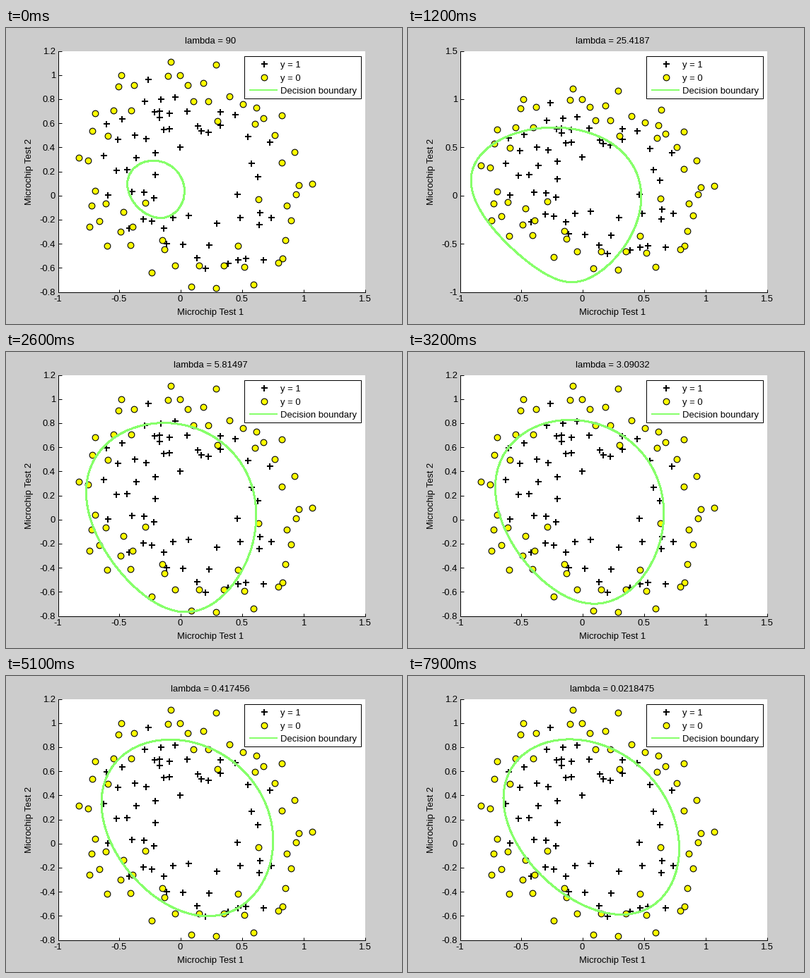
Recreate the animation shown at these times as a matplotlib script. Size 560 by 420 pixels, loop 8000 ms.

```python
import numpy as np
import matplotlib.pyplot as plt
from matplotlib.animation import FuncAnimation
from matplotlib.patches import Rectangle

W, H = 560, 420
PX = 0.72  # points per pixel at 100 dpi
FRAMES, INTERVAL = 80, 100
DEGREE = 3
GREEN = (0.53, 1, 0.42)

plt.rcParams["font.family"] = "Liberation Sans"
plt.rcParams["font.size"] = 13 * PX

passed = np.array([
    (.051, .700), (-.093, .685), (-.214, .692), (-.375, .502), (-.513, .466),
    (-.525, .210), (-.398, .034), (-.306, -.192), (.017, -.404), (.132, -.514),
    (.385, -.565), (.529, -.521), (.639, -.243), (.737, -.185), (.547, .488),
    (.322, .583), (.166, .539), (-.047, .817), (-.173, .700), (-.479, .634),
    (-.605, .597), (-.628, .334), (-.594, .005), (-.421, -.273), (-.116, -.397),
    (.201, -.602), (.466, -.536), (.673, -.536), (-.139, .546), (-.294, .780),
    (-.266, .963), (-.162, .802), (-.173, .648), (-.283, .473), (-.363, .312),
    (-.300, .027), (-.237, -.214), (-.064, -.185), (.063, -.163), (.230, -.412),
    (.293, -.229), (.483, -.185), (.645, -.141), (.460, .012), (.627, .159),
    (.575, .268), (.725, .444), (.224, .524), (.443, .670), (.322, .692),
    (.138, .575), (-.006, .400), (-.093, .553), (-.208, .356), (-.208, .173),
    (-.438, .217), (-.219, -.017), (-.139, -.273)])

failed = np.array([
    (.184, .933), (.224, .780), (.299, .619), (.506, .758), (.616, .729),
    (.604, .597), (.766, .502), (.927, .363), (.823, .276), (.961, .086),
    (.938, .012), (.863, -.083), (.898, -.207), (.852, -.368), (.829, -.521),
    (.794, -.558), (.593, -.741), (.518, -.594), (.466, -.419), (.351, -.580),
    (.287, -.770), (.086, -.755), (.149, -.580), (-.133, -.448), (-.410, -.412),
    (-.392, -.258), (-.744, -.258), (-.698, .042), (-.755, .290), (-.698, .685),
    (-.404, .707), (-.381, .919), (-.507, .904), (-.548, .707), (.103, .780),
    (.057, .919), (-.104, .992), (-.081, 1.109), (.287, 1.087), (.397, .824),
    (.639, .890), (.823, .663), (.673, .641), (1.071, .100), (-.047, -.580),
    (-.237, -.638), (-.150, -.368), (-.490, -.302), (-.467, -.134), (-.289, -.061),
    (-.611, -.068), (-.663, -.214), (-.600, -.419), (-.726, -.083), (-.830, .312),
    (-.721, .539), (-.594, .495), (-.484, .999), (-.006, .999), (.633, -.031)])


def features(x, y):
    """All monomials of x and y up to DEGREE."""
    return np.stack([x ** (i - j) * y ** j
                     for i in range(DEGREE + 1) for j in range(i + 1)], axis=-1)


X = features(*np.vstack([passed, failed]).T)
labels = np.r_[np.ones(len(passed)), np.zeros(len(failed))]


def fit(lam, theta):
    """Regularised logistic regression by Newton's method."""
    reg = np.full(X.shape[1], lam)
    reg[0] = 0
    for _ in range(12):
        p = 1 / (1 + np.exp(-X @ theta))
        grad = X.T @ (p - labels) + reg * theta
        hess = (X.T * (p * (1 - p))) @ X + np.diag(reg)
        theta = theta - np.linalg.solve(hess, grad)
    return theta


lambdas = 90 * 0.9 ** np.arange(FRAMES)
thetas = [np.zeros(X.shape[1])]
for lam in lambdas:
    thetas.append(fit(lam, thetas[-1]))
thetas = thetas[1:]

grid = np.linspace(-1, 1.5, 50)
grid_features = features(*np.meshgrid(grid, grid))

fig = plt.figure(figsize=(W / 100, H / 100), dpi=100, facecolor="#cccccc")

ax = fig.add_axes([73.5 / W, 1 - 374.5 / H, 434 / W, 342 / H])
ax.spines[["top", "right"]].set_visible(False)
ax.spines[["left", "bottom"]].set_linewidth(PX)
ax.tick_params(direction="in", length=4.5 * PX, width=PX, labelbottom=False,
               pad=3.5 * PX)
ax.set_xlim(-1, 1.5)
ax.set_xticks(np.arange(-1, 1.6, 0.5))

# overlay in pixel coordinates
top = fig.add_axes([0, 0, 1, 1])
top.set_xlim(0, W)
top.set_ylim(H, 0)
top.axis("off")

plus = dict(ls="", marker="+", color="k", ms=9 * PX, mew=2 * PX)
disc = dict(ls="", marker="o", mfc="#ffff00", mec="k", ms=8.7 * PX, mew=1.1 * PX)
ax.plot(*passed.T, **plus)
ax.plot(*failed.T, **disc)


def label(x, y, s, ha="center", **kw):
    return top.text(x, y, s, ha=ha, va="baseline", **kw)


for t in ax.get_xticks():
    label(246.6 + 173.6 * t, 388, f"{t:g}")
label(289, 407, "Microchip Test 1")
label(36, 203.5, "Microchip Test 2", rotation=90, rotation_mode="anchor")
title = label(289, 22, "")

top.add_patch(Rectangle((336.5, 39.5), 165, 60, fc="w", ec="k", lw=PX))
top.plot(364.5, 50.5, **plus)
top.plot(364.5, 70, **disc)
top.plot([344, 384], [88, 88], color=GREEN, lw=2 * PX, solid_capstyle="butt")
for y, s in [(56, "y = 1"), (75, "y = 0"), (93, "Decision boundary")]:
    label(388, y, s, ha="left")

boundary = []


def update(i):
    while boundary:
        boundary.pop().remove()
    cs = ax.contour(grid, grid, grid_features @ thetas[i], levels=[0],
                    colors=[GREEN], linewidths=2 * PX, antialiased=False, zorder=3)
    boundary.append(cs)

    low = min((seg[:, 1].min() for seg in cs.allsegs[0]), default=0)
    if low < -0.8:
        lo, hi, step = -1, 1.5, 0.5
    else:
        lo, hi, step = -0.8, 1.2, 0.2
    ticks = np.round(np.arange(lo, hi + step / 2, step), 1)
    ax.set_yticks(ticks, [f"{t + 0.0:g}" for t in ticks])
    ax.set_xlim(-1, 1.5)
    ax.set_ylim(lo, hi)
    title.set_text(f"lambda = {lambdas[i]:.6g}")


anim = FuncAnimation(fig, update, frames=FRAMES, interval=INTERVAL,
                     repeat=True, repeat_delay=0)
plt.show()
```
